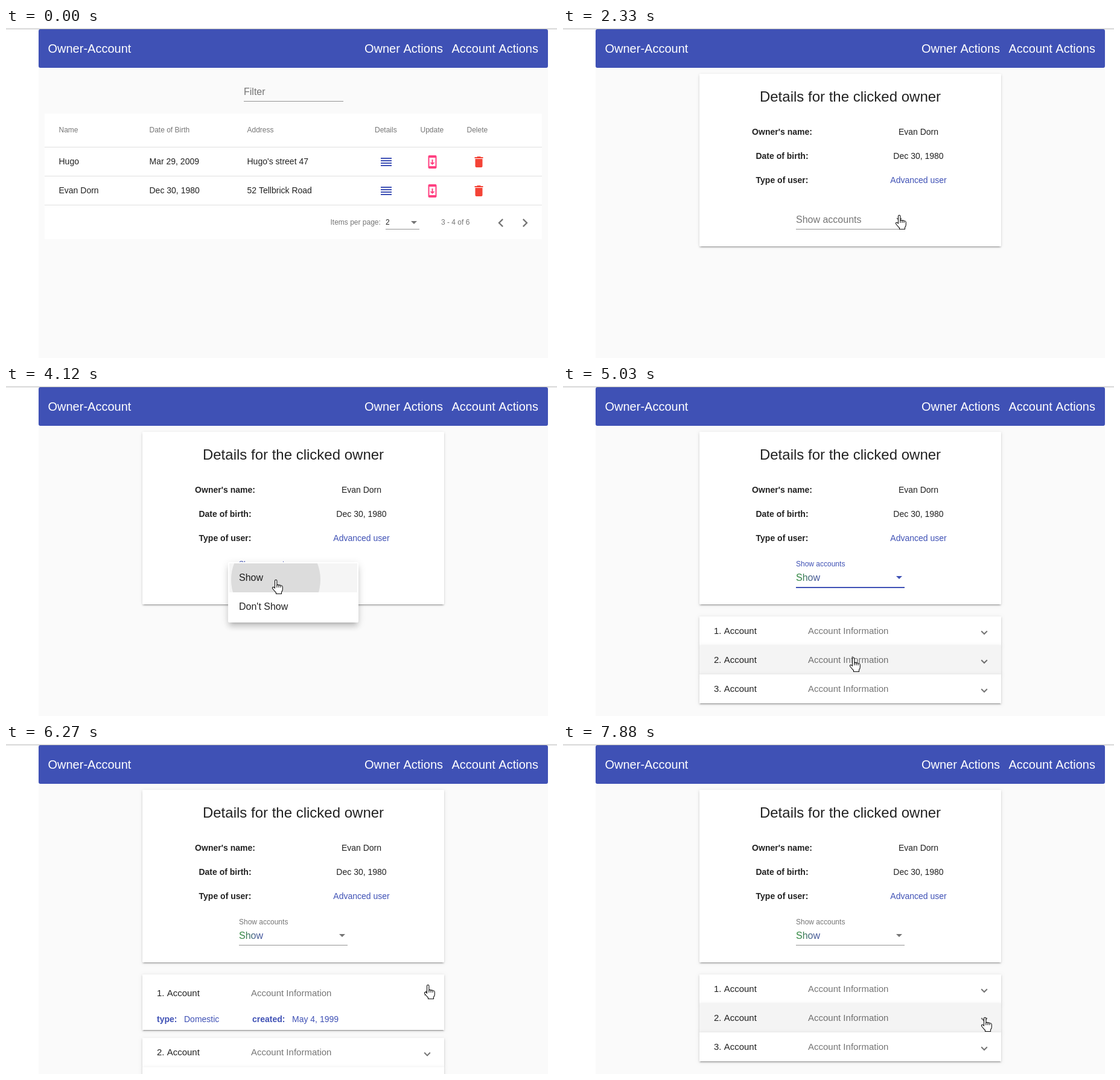
Write an HTML page with a canvas that moves like this. It is 913 px wide and 547 px high and loops after 8000 ms.

```html
<!DOCTYPE html>
<html lang="en">
<head>
<meta charset="utf-8">
<title>Owner details</title>
<style>
html, body { margin: 0; height: 100%; overflow: hidden; background: #fff; }
canvas { display: block; }
</style>
</head>
<body>
<canvas id="stage" width="913" height="547"></canvas>
<script>
const c = document.getElementById('stage').getContext('2d');
const INK = 'rgba(0,0,0,.87)', GREY = 'rgba(0,0,0,.54)', RULE = 'rgba(0,0,0,.42)';
const BLUE = '#3f51b5', PINK = '#ff4081', RED = '#f44336';

const ICON = {
  list: 'M3 15h18v-2H3zM3 19h18v-2H3zM3 11h18V9H3zM3 5v2h18V5z',
  update: 'M17 1H7c-1.1 0-2 .9-2 2v18c0 1.1.9 2 2 2h10c1.1 0 2-.9 2-2V3c0-1.1-.9-2-2-2zM17 19H7V5h10zM16 13h-3V8h-2v5H8l4 4z',
  bin: 'M6 19c0 1.1.9 2 2 2h8c1.1 0 2-.9 2-2V7H6zM19 4h-3.5l-1-1h-5l-1 1H5v2h14z',
  prev: 'M15.4 7.4L14 6l-6 6 6 6 1.4-1.4L10.8 12z',
  next: 'M10 6L8.6 7.4 13.2 12l-4.6 4.6L10 18l6-6z',
  caret: 'M7 10l5 5 5-5z',
  hand: 'M-1.5 14V2A1.7 1.7 0 0 1 1.9 2V9Q3.5 7.6 5 9.3Q6.6 8.2 8 10Q10.8 9.2 11.3 12V16Q11.3 18.5 9.5 20.5V23.5H.5V21.5Q-2.5 18.5-5.5 14.5Q-5.8 12-3.8 12.3Z',
  fingers: 'M1.9 9V13M5 9.5V13M8 10.5V13',
  arrow: 'M.5 .5V16L4 12.8L6.5 18.5L9 17.5L6.5 11.8H11.5Z'
};
for (const k in ICON) ICON[k] = new Path2D(ICON[k]);

// Elevation layers: y offset, blur, spread, opacity
const LOW = [[3, 1, -2, .2], [2, 2, 0, .14], [1, 5, 0, .12]];
const HIGH = [[5, 5, -3, .2], [8, 10, 1, .14], [3, 14, 2, .12]];

// Pointer moves: start, end, number of steps, target x, target y
const MOVES = [
  [610, 1070, 7, 632, 270],
  [2100, 2330, 4, 557, 310], [2410, 2480, 2, 524, 321],
  [2710, 2780, 2, 541, 321],
  [3260, 3720, 7, 464, 329], [3800, 3800, 1, 447, 321],
  [4720, 4870, 3, 420, 400], [4950, 5030, 2, 481, 450], [5110, 5490, 6, 648, 523],
  [5570, 5950, 6, 699, 399], [7580, 7880, 5, 699, 453]
];
const CLICKS = [[1470, 1640], [2950, 3030], [4030, 4110], [6040, 6110], [7330, 7500]];

// Progress from 0 to 1 in n equal jumps, the first at a and the last at b
function step(t, a, b, n) {
  if (t < a) return 0;
  return Math.min(1, (Math.floor((t - a) / (b - a || 1) * (n - 1) + 1e-6) + 1) / n);
}
const ease = p => p * p * (3 - 2 * p);
const mix = (a, b, p) => a + (b - a) * p;

function text(s, x, y, size, color = INK, align = 'left', weight = '') {
  c.font = `${weight} ${size}px "Liberation Sans", Arial, sans-serif`;
  c.textAlign = align;
  c.fillStyle = color;
  c.fillText(s, x, y);
}
function rect(x, y, w, h, color) {
  c.fillStyle = color;
  c.fillRect(x, y, w, h);
}
function icon(path, x, y, color, scale = 1) {
  c.save();
  c.translate(x, y);
  c.scale(scale, scale);
  c.fillStyle = color;
  c.fill(path, 'evenodd');
  c.restore();
}
function round(x, y, w, h, r, color) {
  c.fillStyle = color;
  c.beginPath();
  c.roundRect(x, y, w, h, r);
  c.fill();
}
function card(x, y, w, h, r = 0, layers = LOW) {
  for (const [dy, blur, grow, alpha] of layers) {
    c.save();
    c.shadowColor = `rgba(0,0,0,${alpha})`;
    c.shadowBlur = blur;
    c.shadowOffsetY = dy;
    round(x - grow, y - grow, w + 2 * grow, h + 2 * grow, r, '#fff');
    c.restore();
  }
  round(x, y, w, h, r, '#fff');
}
function disc(x, y, r, color) {
  c.fillStyle = color;
  c.beginPath();
  c.arc(x, y, r, 0, 7);
  c.fill();
}

function page() {
  rect(0, 0, 913, 547, '#fff');
  rect(0, 1, 913, 1, '#b8b8b8');
  rect(54, 2, 844, 545, '#fafafa');
  round(54, 2, 844, 64, 3, BLUE);
  text('Owner-Account', 69.5, 41, 20, '#fff');
  text('Owner Actions', 594, 41, 20, '#fff');
  text('Account Actions', 738.5, 41, 20, '#fff');
}

function table() {
  text('Filter', 394, 111, 16, GREY);
  rect(394, 121, 165, 1, RULE);
  rect(64, 142, 824, 208, '#fff');
  const cols = [87.5, 237.5, 399.5, 611, 686.5, 763.5];
  ['Name', 'Date of Birth', 'Address', 'Details', 'Update', 'Delete']
    .forEach((s, i) => text(s, cols[i], 173, 12, GREY));
  [['Hugo', 'Mar 29, 2009', "Hugo's street 47"],
   ['Evan Dorn', 'Dec 30, 1980', '52 Tellbrick Road']].forEach((row, i) => {
    const y = 226 + 48 * i;
    row.forEach((s, j) => text(s, cols[j], y, 14));
    icon(ICON.list, 618, y - 16, BLUE);
    icon(ICON.update, 694.5, y - 16, PINK);
    icon(ICON.bin, 771.5, y - 16, RED);
  });
  for (const y of [197, 245, 293]) rect(64, y, 824, 1, '#e0e0e0');
  text('Items per page:', 537.5, 326, 12, GREY);
  text('2', 629, 326, 12);
  rect(629, 333, 56, 1, RULE);
  icon(ICON.caret, 664, 310, GREY);
  text('3 - 4 of 6', 721, 326, 12, GREY);
  icon(ICON.prev, 806, 309, GREY, 28 / 24);
  icon(ICON.next, 846, 309, GREY, 28 / 24);
}

function details(t) {
  card(226, 76, 500, 286, 2);
  text('Details for the clicked owner', 476, 122, 24, INK, 'center');
  [["Owner's name:", 'Evan Dorn', INK],
   ['Date of birth:', 'Dec 30, 1980', INK],
   ['Type of user:', 'Advanced user', BLUE]].forEach(([label, value, color], i) => {
    text(label, 363, 177 + 40 * i, 14, INK, 'center', 'bold');
    text(value, 589, 177 + 40 * i, 14, color, 'center');
  });

  const lift = ease(step(t, 3030, 3270, 4));
  const focus = t >= 3030 && t < 6040;
  text('Show accounts', 386, mix(323, 299, lift), mix(16, 12, lift), focus ? BLUE : GREY);
  rect(386, 333, 180, focus ? 2 : 1, focus ? BLUE : RULE);
  icon(ICON.caret, 545, 305, focus ? BLUE : GREY);
  if (t >= 4180) {
    const g = c.createLinearGradient(386, 0, 426, 0);
    ['#2e8b3a', '#3a7d55', '#4a6190', '#41539f'].forEach((s, i) => g.addColorStop(i / 3, s));
    text('Show', 386, 323, 16, g);
  }
}

function accounts(t, ptr) {
  const open = ease(step(t, 6110, 6350, 4)) - ease(step(t, 7500, 7730, 4));
  for (let i = 0; i < 3; i++) {
    const p = i ? 0 : open;
    const y = 382 + 48 * i + (i ? 68 * open : 0);
    const h = 48 + 52 * p, mid = y + 24 + 8 * p;
    card(226, y, 500, h);
    c.save();
    c.beginPath();
    c.rect(226, y, 500, h);
    c.clip();
    if (!p && ptr.x > 226 && ptr.x < 726 && ptr.y >= y && ptr.y < y + 48) rect(226, y, 500, 48, '#f4f4f4');
    text(`${i + 1}. Account`, 250, mid + 5, 15);
    text('Account Information', 406, mid + 5, 15, GREY);
    c.save();
    c.translate(698, mid + 1);
    c.rotate(Math.PI * p);
    c.strokeStyle = GREY;
    c.lineWidth = 2;
    c.beginPath();
    c.moveTo(-4.8, -.8);
    c.lineTo(0, 4);
    c.lineTo(4.8, -.8);
    c.stroke();
    c.restore();
    if (p) {
      text('type:', 250, y + 79, 14, BLUE, 'left', 'bold');
      text('Domestic', 295, y + 79, 14, BLUE);
      text('created:', 408, y + 79, 14, BLUE, 'left', 'bold');
      text('May 4, 1999', 474, y + 79, 14, BLUE);
    }
    c.restore();
  }
}

function menu(t, ptr) {
  const alpha = step(t, 3030, 3110, 2) - step(t, 4180, 4260, 2);
  if (alpha <= 0) return;
  c.save();
  c.globalAlpha = alpha;
  card(370, 294, 212, 96, 2, HIGH);
  rect(370, 294, 212, 48, '#f5f5f5');
  if (t >= 4030) {
    c.save();
    c.beginPath();
    c.rect(370, 294, 212, 48);
    c.clip();
    disc(ptr.x, ptr.y, 8 + (t < 4120 ? 0 : t < 4180 ? 66 : 130), 'rgba(0,0,0,.1)');
    c.restore();
  }
  text('Show', 386, 323, 16);
  text("Don't Show", 386, 371, 16);
  c.restore();
}

function pointerAt(t) {
  let x = 757, y = 424;
  for (const [a, b, n, tx, ty] of MOVES) {
    const p = step(t, a, b, n);
    x = mix(x, tx, p);
    y = mix(y, ty, p);
  }
  return { x: Math.round(x), y: Math.round(y) };
}

function pointer(t, { x, y }) {
  if (t < 610) return;
  if (CLICKS.some(([a, b]) => t >= a && t < b)) disc(x, y, 12, 'rgba(250,246,40,.66)');
  const hand = t < 1555 ? y < 285 : y > 300 && y < 340 && x < 570 || y > 382 && y < 526;
  const shape = hand ? ICON.hand : ICON.arrow;
  c.save();
  c.translate(x, y);
  c.fillStyle = '#fff';
  c.strokeStyle = '#111';
  c.lineWidth = 1.1;
  c.fill(shape);
  c.stroke(shape);
  if (hand) c.stroke(ICON.fingers);
  c.restore();
}

function draw() {
  const t = performance.now() % 8000, ptr = pointerAt(t);
  page();
  if (t < 1555) table();
  else {
    details(t);
    if (t >= 4180) accounts(t, ptr);
    menu(t, ptr);
  }
  pointer(t, ptr);
  requestAnimationFrame(draw);
}
draw();
</script>
</body>
</html>
```
